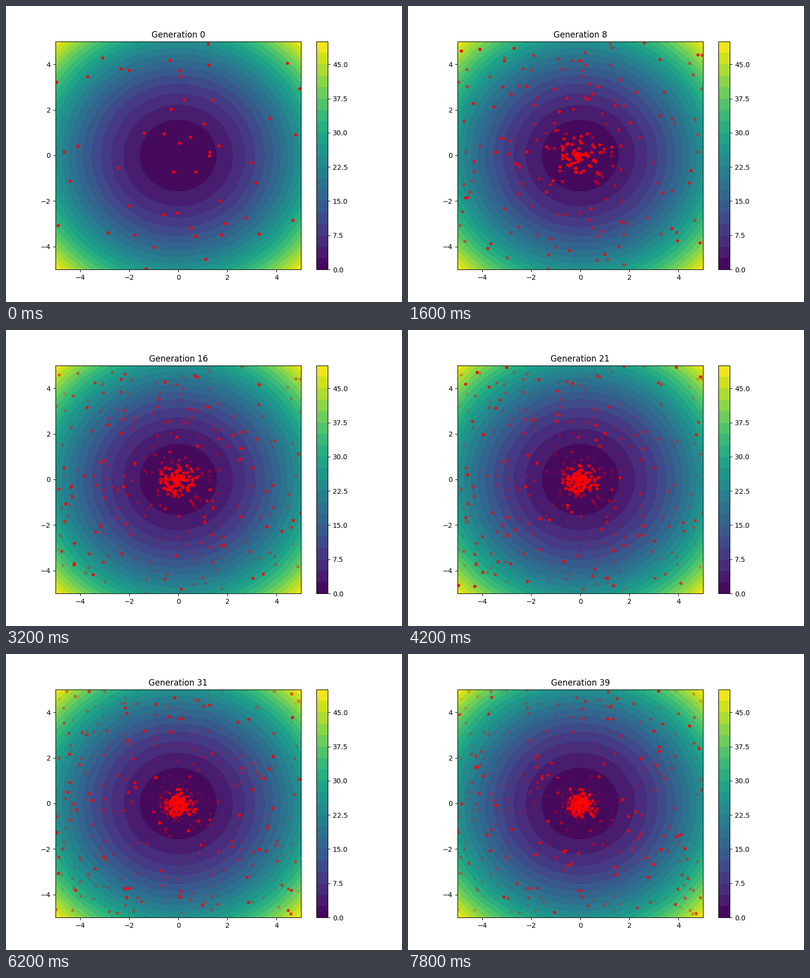
Recreate the animation shown at these times as a matplotlib script. Size 800x600 px, loop 8000 ms.

```python
import numpy as np
import matplotlib.pyplot as plt
from matplotlib.animation import FuncAnimation

GENERATIONS = 40
STEP_MS = 200
POPULATION = 50
MUTANTS = 12         # uniform newcomers per generation
FADE = 0.92          # brightness kept per generation after a point dies out
LIMIT = 5

# The fittest points of the starting population.
LEADERS = [(0.5, 0.8), (-0.57, 0.95), (-0.19, -0.73), (0.72, -0.73),
           (1.27, -0.02), (1.67, 0.42), (-0.28, 2.02), (0.25, 2.45)]


def scattered(rng, count):
    return rng.uniform(-LIMIT, LIMIT, (count, 2))


def offspring(rng, gen):
    """Children gather ever closer around the minimum, and ever fewer are new."""
    count = round(3 + 13 * np.exp(-gen / 7))
    spread = 0.24 + 1.1 * np.exp(-gen / 4)
    return rng.normal(0, (1.1 * spread, spread), (count, 2))


def evolve(rng):
    """Return positions, birth generations and last living generations."""
    groups = [np.vstack([LEADERS, scattered(rng, POPULATION - len(LEADERS))])]
    for gen in range(1, GENERATIONS):
        groups.append(np.vstack([scattered(rng, MUTANTS), offspring(rng, gen)]))
    pos = np.vstack(groups)
    born = np.repeat(np.arange(GENERATIONS), [len(g) for g in groups])
    # Fit points near the minimum live longest.
    dist = np.hypot(*pos.T)
    life = 30 * np.exp(-(dist / 0.55) ** 2)
    life += rng.exponential(4, len(pos)) * np.exp(-dist / 2)
    return pos, born, born + np.floor(life)


pos, born, last = evolve(np.random.default_rng(7))

fig, ax = plt.subplots(figsize=(8, 6), dpi=100)
axis = np.linspace(-LIMIT, LIMIT, 100)
gx, gy = np.meshgrid(axis, axis)
field = ax.contourf(gx, gy, gx ** 2 + gy ** 2, levels=20, cmap="viridis")
fig.colorbar(field, ax=ax)
dots = ax.scatter([], [], s=21.7, linewidths=0)
ax.set_xlim(-LIMIT, LIMIT)
ax.set_ylim(-LIMIT, LIMIT)
title = ax.set_title("Generation 0")


def update(gen):
    shown = born <= gen
    alpha = FADE ** np.maximum(gen - last[shown], 0)
    order = np.argsort(alpha, kind="stable")   # living points on top
    colors = np.zeros((len(alpha), 4))
    colors[:, 0] = 1
    colors[:, 3] = alpha[order]
    dots.set_offsets(pos[shown][order])
    dots.set_facecolors(colors)
    title.set_text(f"Generation {gen}")
    return dots, title


anim = FuncAnimation(fig, update, frames=GENERATIONS, interval=STEP_MS,
                     repeat=True, repeat_delay=0)
plt.show()
```
